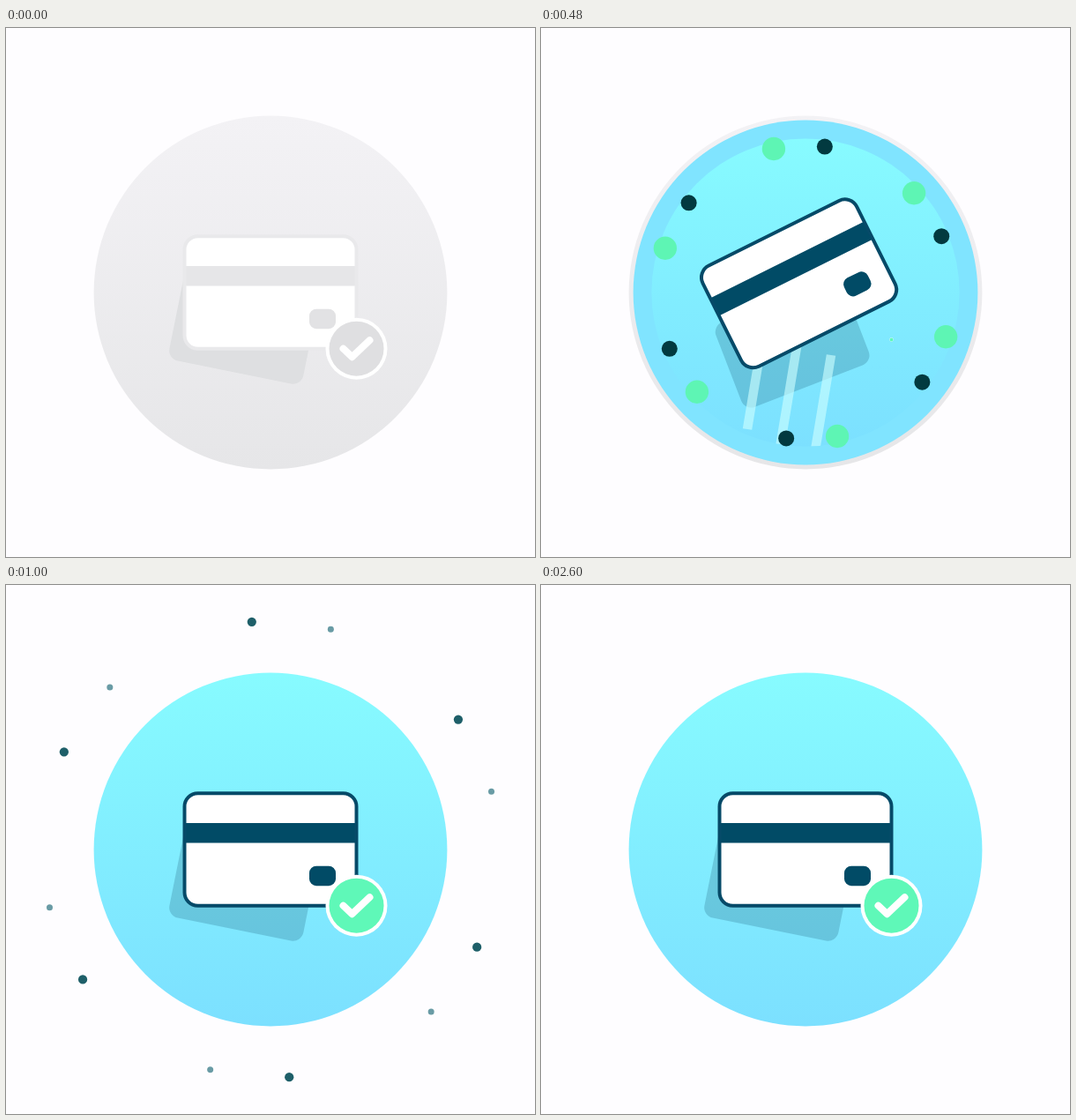
These frames come from a looping animation (600 by 600 pixels, 2640 ms). An HTML page with a canvas:

```html
<!DOCTYPE html>
<html lang="en">
<head>
<meta charset="utf-8">
<title>Card confirmed</title>
<style>
  html, body { margin: 0; width: 100%; height: 100%; overflow: hidden; background: #fefdff; }
  canvas { display: block; width: 600px; height: 600px; }
</style>
</head>
<body>
<canvas id="stage" width="600" height="600"></canvas>
<script>
const ctx = document.getElementById('stage').getContext('2d');
const LOOP = 2640, STEP = 40, CENTER = 300, DISC = 200.4, TAU = Math.PI * 2;

const GRAY = {
  top: '#f3f2f5', bottom: '#e6e6e8', line: '#e9e9eb', stripe: '#e6e6e8',
  chip: '#e2e2e4', shadow: '#dedfe1', badge: '#dfdfe1'
};
const COLOR = {
  top: '#87fbff', bottom: '#7ce0ff', line: '#064a68', stripe: '#014b66',
  chip: '#014b66', shadow: 'rgba(14,74,98,0.21)', badge: '#5ff8b8'
};
const RING = '#80e4ff';

const BIG_DOT = { turn: 0, size: 13.6, colors: [[36, 150, 118], [94, 245, 180], [74, 144, 168], [30, 95, 105]] };
const SMALL_DOT = { turn: 20, size: 9.3, colors: [[66, 143, 158], [2, 58, 64], [47, 185, 170], [105, 155, 165]] };

const clamp = x => Math.max(0, Math.min(1, x));
const progress = (t, from, to) => clamp((t - from) / (to - from));
const smooth = u => u * u * (3 - 2 * u);
const sineInOut = u => (1 - Math.cos(Math.PI * u)) / 2;
const sineOut = u => Math.sin(Math.PI / 2 * u);
const quartOut = u => 1 - (1 - u) ** 4;
// What is left of a decelerating move that reads 1 at 320 ms and 0 at the end.
const remaining = (t, end, power = 2) => (Math.max(0, end - t) / (end - 320)) ** power;

const ringRadius = t => DISC * quartOut(progress(t, 0, 797));
const innerRadius = t => DISC * sineOut(progress(t, 88, 670));
const badgeScale = t => progress(t, 455, 865);
const checkLength = t => smooth(progress(t, 700, 900));

const cardPose = t => ({
  x: 300 - 15.4 * remaining(t, 778, 1.7),
  y: t < 680 ? 251 + 0.00097 * (680 - t) ** 2 : 251 + 49 * smooth(progress(t, 680, 920)),
  turn: -62.5 * remaining(t, 778)
});

const shadowPose = t => ({
  x: 269.2 + 25.8 * (1 - smooth(progress(t, 320, 700))),
  y: 292 + 132 * (1 - smooth(progress(t, 260, 700))) + 48 * smooth(progress(t, 700, 920)),
  turn: 11.4 - 71.4 * remaining(t, 812)
});

const REST_CARD = cardPose(LOOP), REST_SHADOW = shadowPose(LOOP);

function disc(x, y, r, fill) {
  if (r <= 0) return;
  ctx.beginPath();
  ctx.arc(x, y, r, 0, TAU);
  ctx.fillStyle = fill;
  ctx.fill();
}

function gradientDisc(r, colors) {
  const g = ctx.createLinearGradient(0, CENTER - r, 0, CENTER + r);
  g.addColorStop(0, colors.top);
  g.addColorStop(1, colors.bottom);
  disc(CENTER, CENTER, r, g);
}

function roundBox(x, y, w, h, r) {
  ctx.beginPath();
  ctx.roundRect(x, y, w, h, r);
}

function placed({ x, y, turn = 0, scale = 1 }, draw) {
  ctx.save();
  ctx.translate(x, y);
  ctx.rotate(turn * Math.PI / 180);
  ctx.scale(scale, scale);
  draw();
  ctx.restore();
}

function drawShadow(pose, colors) {
  placed(pose, () => {
    roundBox(-77.5, -51.5, 155, 103, 12);
    ctx.fillStyle = colors.shadow;
    ctx.fill();
  });
}

function drawCard(pose, colors) {
  placed(pose, () => {
    roundBox(-97.5, -63.8, 195, 127.6, 15);
    ctx.fillStyle = '#fff';
    ctx.fill();
    ctx.fillStyle = colors.stripe;
    ctx.fillRect(-97, -30, 194, 22.5);
    ctx.strokeStyle = colors.line;
    ctx.lineWidth = 4;
    roundBox(-97.5, -63.8, 195, 127.6, 15);
    ctx.stroke();
    roundBox(44, 18.7, 30, 22.5, 8);
    ctx.fillStyle = colors.chip;
    ctx.fill();
  });
}

function drawBadge(cardY, scale, check, colors) {
  if (scale <= 0) return;
  placed({ x: 397.5, y: cardY + 63.7, scale }, () => {
    disc(0, 0, 35, '#fff');
    disc(0, 0, 31, colors.badge);
    if (check <= 0) return;
    const length = 42;
    ctx.beginPath();
    ctx.moveTo(-15, 0);
    ctx.lineTo(-5, 9.5);
    ctx.lineTo(15, -9.5);
    ctx.setLineDash([length * check, length]);
    ctx.strokeStyle = '#fff';
    ctx.lineWidth = 8;
    ctx.lineCap = ctx.lineJoin = 'round';
    ctx.stroke();
  });
}

function drawTrails(t) {
  const alpha = 0.62 * progress(t, 340, 440) * (1 - progress(t, 600, 740));
  if (alpha <= 0) return;
  const u = (t - 480) / 160;
  ctx.strokeStyle = `rgba(205,255,255,${alpha})`;
  ctx.lineWidth = 10.5;
  for (let i = 0; i < 3; i++) {
    const x = 234 + 37 * i + (19 + i) * u;
    const y = 455 + 21 * i - 124 * u;
    ctx.beginPath();
    ctx.moveTo(x, y);
    ctx.lineTo(x + 21, y - 126);
    ctx.stroke();
  }
}

function dotColor(colors, t) {
  const at = t < 640 ? progress(t, 320, 640) * 2 : 2 + progress(t, 640, 1000);
  const i = Math.min(2, Math.floor(at));
  const mix = colors[i].map((c, k) => Math.round(c + (colors[i + 1][k] - c) * (at - i)));
  return `rgb(${mix})`;
}

function drawDots(t, dot) {
  const spread = sineInOut(progress(t, -223, 962));
  const size = dot.size * Math.sin(Math.PI * progress(t, 0, 1140)) * progress(t, 160, 280);
  const fill = dotColor(dot.colors, t);
  for (let i = 0; i < 6; i++) {
    const a = (-108 + 13.3 * spread ** 2 + dot.turn + 60 * i) * Math.PI / 180;
    disc(CENTER + 259 * spread * Math.cos(a), CENTER + 259 * spread * Math.sin(a), size, fill);
  }
}

function drawColorScene(t) {
  const inner = innerRadius(t), card = cardPose(t);
  if (inner <= 0) return;
  gradientDisc(inner, COLOR);
  ctx.save();
  ctx.beginPath();
  ctx.arc(CENTER, CENTER, inner, 0, TAU);
  ctx.clip();
  drawShadow(shadowPose(t), COLOR);
  drawTrails(t);
  drawCard(card, COLOR);
  drawBadge(card.y, badgeScale(t), checkLength(t), COLOR);
  ctx.restore();
}

function drawGrayScene() {
  gradientDisc(DISC, GRAY);
  drawShadow(REST_SHADOW, GRAY);
  drawCard(REST_CARD, GRAY);
  drawBadge(REST_CARD.y, 1, 1, GRAY);
}

function render(t) {
  ctx.fillStyle = '#fefdff';
  ctx.fillRect(0, 0, 600, 600);
  if (t < 640) {
    drawGrayScene();
    disc(CENTER, CENTER, ringRadius(t), RING);
  }
  drawColorScene(t);
  drawDots(t, BIG_DOT);
  drawDots(t, SMALL_DOT);
}

const start = performance.now();
function tick() {
  const t = (performance.now() - start) % LOOP;
  render(Math.floor(t / STEP) * STEP);
  requestAnimationFrame(tick);
}
tick();
</script>
</body>
</html>
```
